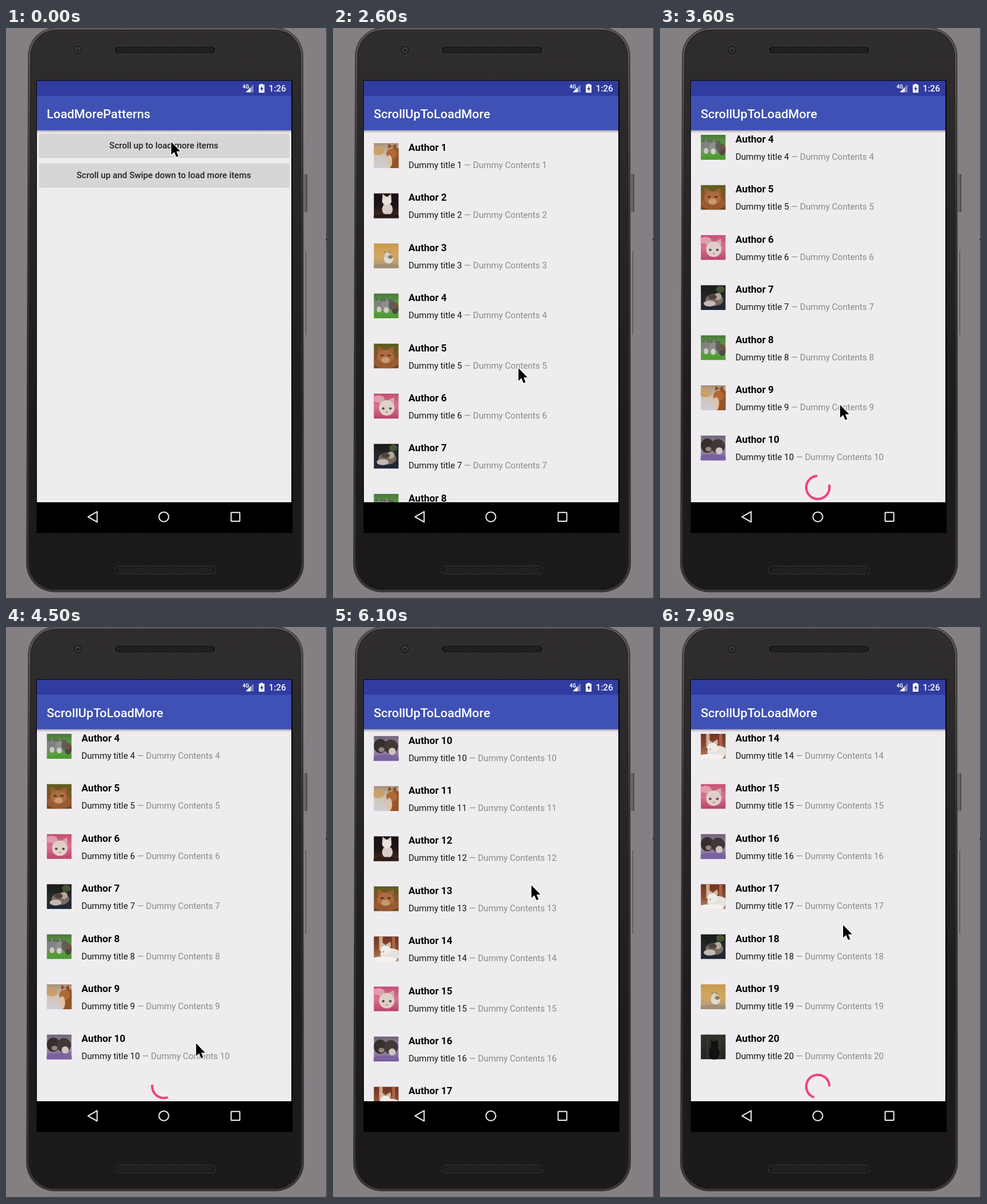
Write an HTML page that moves like this. It is 540 px wide and 962 px high and loops after 8000 ms.

```html
<!DOCTYPE html>
<html lang="en">
<head>
<meta charset="utf-8">
<title>Load more</title>
<style>
  html, body { margin: 0; width: 100%; height: 100%; overflow: hidden; background: #837f83; }
  svg { display: block; width: 100%; height: 100%; font-family: Roboto, "Noto Sans", sans-serif; }
  .title { font-size: 20.9px; font-weight: 500; fill: #fff; }
  .label { font-size: 14.6px; font-weight: 500; fill: #222; text-anchor: middle; }
  .author { font-size: 16.6px; font-weight: 700; fill: #050505; }
  .body { font-size: 14.6px; fill: #151415; }
  .soft { fill: #8a888b; }
  .wait { font-size: 14.6px; fill: #757377; text-anchor: middle; }
</style>
</head>
<body>
<svg id="stage" viewBox="0 0 540 962" xmlns="http://www.w3.org/2000/svg"></svg>
<script>
const LOOP = 8000, STEP = 100, PITCH = 84.4;
const PAGE_END = 267.2, LIST_AT = 2300, MORE_AT = 4900;
const BG = '#eeecef', PINK = '#f3427c';

const rect = (x, y, w, h, fill, more = '') =>
  `<rect x="${x}" y="${y}" width="${w}" height="${h}" fill="${fill}" ${more}/>`;
const oval = (fill, cx, cy, rx, ry) =>
  `<ellipse cx="${cx}" cy="${cy}" rx="${rx}" ry="${ry}" fill="${fill}"/>`;
const text = (cls, x, y, str) => `<text class="${cls}" x="${x}" y="${y}">${str}</text>`;
const gradient = (id, ...colors) => `<linearGradient id="${id}" x2="0" y2="1">` +
  colors.map((c, i) => `<stop offset="${i / (colors.length - 1)}" stop-color="${c}"/>`).join('') +
  '</linearGradient>';
const clip = (id, shape) => `<clipPath id="${id}">${shape}</clipPath>`;
const ears = (fill, cx, cy, w, h) =>
  `<path d="M${cx - w} ${cy}l1 ${-h} ${w - 1} ${h * .6}zM${cx + w} ${cy}l-1 ${-h} ${1 - w} ${h * .6}z" fill="${fill}"/>`;

// Thumbnails on a 42 by 42 square: sky colours and a few flat shapes
const thumbs = {
  side: [['#a78f74', '#d0c4b8', '#cfced8'], oval('#c9a06c', 8, 13, 10, 7), oval('#965426', 36, 27, 12, 20),
    ears('#8b4a22', 31, 9, 7, 8), oval('#ad6a38', 30, 18, 9, 9), oval('#dcc3ab', 26, 31, 5, 11)],
  white: [['#171113', '#1c1416', '#4b2c20'], oval('#d9cdc8', 23, 27, 9, 10), ears('#d8c6bf', 22, 10, 8, 9),
    oval('#ebe2dd', 22, 13, 8, 7), oval('#2c1a16', 21, 40, 24, 5)],
  sand: [['#c79b52', '#d2a860', '#a9977c'], oval('#a39076', 21, 39, 24, 5), oval('#e3dcd0', 25, 26, 8, 8),
    ears('#8d7c68', 23, 18, 5, 5), oval('#d9d0c4', 23, 20, 5, 5), oval('#8a7963', 28, 23, 4, 3)],
  lawn: [['#48793a', '#63a345', '#4c9a32'], oval('#7f827e', 9, 20, 8, 12), oval('#8d8f8b', 22, 21, 8, 12),
    oval('#4c4a46', 36, 25, 6, 10), oval('#5f5d59', 30, 19, 5, 9), ears('#62635f', 9, 13, 6, 6),
    ears('#62635f', 22, 14, 6, 6), oval('#c9c8c3', 9, 27, 4, 5), oval('#d3d1cb', 21, 28, 4, 5),
    oval('#75533a', 37, 21, 4, 5)],
  tabby: [['#5c5e20', '#84552a', '#6d4520'], oval('#9a5a30', 21, 31, 21, 11), ears('#a0602f', 20, 16, 14, 11),
    oval('#ac6c3e', 20, 22, 14, 11), oval('#c99a72', 20, 28, 7, 5), oval('#4b2a14', 14, 20, 3, 1.2),
    oval('#4b2a14', 26, 20, 3, 1.2)],
  pink: [['#c74f73', '#d97391', '#b8446a'], oval('#e39ab0', 8, 9, 10, 6), ears('#d3a9a6', 22, 17, 13, 11),
    oval('#e0cfc8', 22, 24, 13, 13), oval('#534744', 16, 25, 2.2, 2), oval('#534744', 28, 25, 2.2, 2),
    oval('#c58a8c', 22, 31, 1.8, 1.3)],
  night: [['#171a18', '#252a2b', '#202638'], oval('#465335', 33, 7, 7, 6), oval('#786a60', 23, 25, 15, 10),
    oval('#b3a79a', 29, 19, 6, 6), oval('#c3bab5', 15, 31, 10, 5), oval('#4d4038', 20, 20, 7, 4)],
  purple: [['#6f6276', '#a394b0', '#6c548c'], oval('#352f2e', 11, 17, 11, 12), oval('#403936', 29, 18, 12, 12),
    oval('#cfc4c2', 31, 26, 6, 6), oval('#94857c', 13, 23, 5, 4), oval('#7a61a0', 20, 39, 24, 7)],
  curtain: [['#713321', '#8a4c33', '#b98c68'], rect(9, 0, 6, 24, '#c9a98c'), rect(31, 0, 5, 22, '#a96648'),
    oval('#e8e2df', 28, 30, 17, 10), ears('#d8b8a4', 20, 18, 9, 9), oval('#efebe8', 20, 23, 9, 8),
    oval('#f5f2f0', 17, 39, 22, 5), oval('#d39a92', 16, 26, 1.6, 1.2)],
  black: [['#33322b', '#2b2a25', '#24231f'], rect(10, 0, 2, 42, '#3d3b33'), rect(31, 0, 2, 42, '#3d3b33'),
    oval('#121212', 23, 31, 9, 12), ears('#121212', 23, 16, 6, 7), oval('#121212', 23, 17, 6, 6)]
};
const order = ('side white sand lawn tabby pink night lawn side purple ' +
  'side white tabby curtain pink purple curtain night sand black').split(' ');

const row = (kind, i) => `<g class="row" transform="translate(0 ${i * PITCH})">
  <use href="#${kind}" x="68.5" y="194"/>
  ${text('author', 127, 207, 'Author ' + (i + 1))}
  ${text('body', 127, 236, `Dummy title ${i + 1} <tspan class="soft">— Dummy Contents ${i + 1}</tspan>`)}</g>`;

const bar = title => rect(52, 172, 428, 5, 'url(#shade)') + rect(52, 114, 428, 58.3, '#3f51b5') +
  text('title', 68.5, 151.8, title);

const button = (y, str) => rect(55.5, y + 1.5, 421, 39, '#000', 'rx="2" opacity=".16"') +
  rect(56, y, 420, 39, '#d6d5d7', 'rx="2"') + text('label', 265.5, y + 25, str);

const speaker = y => rect(182, y, 171, 14, '#3c3a3c', 'rx="7"') + rect(183, y + 1, 169, 12, '#151315', 'rx="6"') +
  rect(186, y + 2, 163, 10, 'url(#mesh)', 'rx="5"');

// Body outline, slightly wider at the bottom left
const phone = inset => {
  const l = 34 + inset, r = 501 - inset, t = inset - 1, b = 950.5 - inset, q = 48 - inset;
  const arc = `A${q} ${q} 0 0 1 `;
  return `M${l + 3} ${t + q}${arc}${l + q + 3} ${t}H${r - q - 1}${arc}${r - 1} ${t + q}` +
    `L${r} ${b - q}${arc}${r - q} ${b}H${l + q}${arc}${l} ${b - q}Z`;
};

const defs = `<defs>
  ${gradient('case', '#302d2f', '#272527', '#1e1c1e', '#1b191b')}
  ${gradient('rim', '#5a585a', '#343234', '#2c2a2c', '#3a383a')}
  <linearGradient id="shade" x2="0" y2="1"><stop stop-opacity=".3"/><stop offset="1" stop-opacity="0"/></linearGradient>
  <pattern id="mesh" width="4" height="4" patternUnits="userSpaceOnUse">
    <circle cx="1" cy="1" r=".9" fill="#373537"/><circle cx="3" cy="3" r=".9" fill="#373537"/></pattern>
  ${clip('content', rect(52, 172, 428, 627, '#000'))}
  ${clip('window', rect(52, 114, 428, 685, '#000'))}
  ${clip('press', rect(56, 178, 420, 39, '#000', 'rx="2"'))}
  ${clip('track', rect(196, 497.7, 139.5, 3.4, '#000'))}
  ${clip('square', rect(0, 0, 42, 42, '#000'))}
  ${Object.entries(thumbs).map(([id, [sky, ...parts]]) => gradient(id + 'Sky', ...sky) +
    `<g id="${id}" clip-path="url(#square)">${rect(0, 0, 42, 42, `url(#${id}Sky)`)}${parts.join('')}</g>`).join('')}
</defs>`;

const device = rect(0, 0, 540, 962, '#837f83') +
  rect(538.8, 0, 1.2, 962, '#3b393b') + rect(538, 355, 2, 3, '#2a282a') + rect(0, 960.5, 540, 1.5, '#3b393b') +
  rect(501, 246, 5.5, 64, '#676467') + rect(505.3, 246, 1.2, 64, '#3a383a') +
  rect(503.8, 376, 1.1, 141, '#4f4c4f') +
  `<path d="${phone(0)}" fill="#2b292b"/><path d="${phone(1)}" fill="url(#rim)"/>
   <path d="${phone(4)}" fill="#1c1a1c"/><path d="${phone(5)}" fill="url(#case)"/>` +
  oval('#353335', 121, 37, 10, 10) + oval('#242224', 121, 37, 8, 8) + oval('#3f4247', 121, 37, 4.5, 4.5) +
  oval('#1b1c20', 121, 37.5, 2.6, 2.6) +
  speaker(30) + speaker(906) + rect(51, 88, 431, 763, '#0a090a');

const status = rect(52, 89, 428, 25.2, '#303c9f') + `<g fill="#fff">
  <text x="398" y="101.5" font-size="8.6" font-weight="700">4G</text>
  <path d="M416.3 95.3V108.3H403.3z" opacity=".4"/><path d="M411.5 100.1V108.3H403.3z"/>
  <path d="M425.3 95.6h2.7v-1.6h4v1.6h2.8v13.4h-9.5z"/>
  <path d="M430.8 97.4l-3.4 5.6h2.2v4l3.5-5.7h-2.3z" fill="#303c9f"/>
  <text x="442" y="107" font-size="14.8" font-weight="500">1:26</text></g>`;

const nav = rect(52, 799, 430, 51.5, '#000') + `<g fill="none" stroke="#ececec" stroke-width="2">
  <path d="M138 823.6L153.3 814.9V832.3z" stroke-linejoin="round"/>
  <circle cx="265.5" cy="823.6" r="8.2"/><rect x="378.7" y="816.3" width="14.6" height="14.6" rx=".6"/></g>`;

const menu = rect(52, 172, 428, 627, BG) + bar('LoadMorePatterns') +
  button(178, 'Scroll up to load more items') +
  `<g clip-path="url(#press)"><circle id="ripple" cx="278" cy="197" r="0" fill="#000" opacity=".12"/></g>` +
  button(228, 'Scroll up and Swipe down to load more items');

const feed = `<g id="feed">${rect(52, 114, 428, 685, BG)}
  <g id="wait">${text('wait', 265.5, 479, 'Getting dummy items')}
    <g clip-path="url(#track)">${rect(196, 497, 140, 5, '#f2bccd')}
      ${rect(196, 497, 0, 5, PINK, 'id="run0"')}${rect(196, 497, 0, 5, PINK, 'id="run1"')}</g></g>
  <g clip-path="url(#content)"><g id="list">${order.map(row).join('')}
      <circle id="spin" r="19.5" fill="none" stroke="${PINK}" stroke-width="4" stroke-linecap="square" pathLength="360"/></g>
    <g id="glow"><circle cx="301" cy="736" r="808" fill="#3f51b5"/></g></g>
  ${bar('ScrollUpToLoadMore')}</g>`;

const pointer = `<path id="pointer" d="M0 0V21.5L5 17 8.5 25.2 12 23.7 8.6 15.8H15.2Z"
  fill="#000" stroke="#fff" stroke-width="2.6" paint-order="stroke" stroke-linejoin="round"/>`;

const stage = document.getElementById('stage');
stage.innerHTML = defs + device + `<g clip-path="url(#window)">${menu}${feed}</g>` + status + nav + pointer;

const $ = id => document.getElementById(id);
const set = (id, attrs) => { for (const k in attrs) $(id).setAttribute(k, attrs[k]); };
const show = (node, on) => node.setAttribute('display', on ? 'inline' : 'none');
const clamp = v => Math.max(0, Math.min(1, v));

// Linear interpolation through rows of [time, value, ...]
function track(keys, t, col = 1) {
  if (t <= keys[0][0]) return keys[0][col];
  for (let i = 1; i < keys.length; i++) {
    const a = keys[i - 1], b = keys[i];
    if (t <= b[0]) return a[col] + (b[col] - a[col]) * (t - a[0]) / (b[0] - a[0]);
  }
  return keys[keys.length - 1][col];
}

// cubic-bezier(.4, 0, .2, 1)
function ease(x) {
  let lo = 0, hi = 1, u = .5;
  for (let i = 0; i < 18; i++) {
    u = (lo + hi) / 2;
    const bx = 1.2 * u * (1 - u) ** 2 + .6 * u * u * (1 - u) + u ** 3;
    if (bx < x) lo = u; else hi = u;
  }
  return 3 * u * u * (1 - u) + u ** 3;
}

const mouse = [[700, 278, 192], [800, 281, 220], [1100, 317, 520], [1250, 321, 565], [1300, 321, 565],
  [1600, 318, 600], [2400, 312, 573], [2700, 312, 573], [3000, 318, 330], [3200, 318, 330], [3600, 303, 635],
  [4300, 318, 700], [5200, 326, 706], [5500, 326, 706], [5800, 335, 350], [6000, 335, 350],
  [6400, 330, 690], [6700, 335, 358], [6900, 335, 358], [7500, 316, 470], [7900, 308, 502]];
const scroll = [[2700, 0], [3000, 243], [3100, PAGE_END], [5500, PAGE_END], [5800, 623], [5900, 700],
  [6000, 750], [6200, 790], [6400, 800], [6700, 1111.2]];
const glow = [[2950, 0], [3100, .8], [3200, .6], [3500, 0], [6550, 0], [6700, .95], [6800, 1], [6900, .85], [7200, 0]];

function spinner(age, y) {
  const p = age % 1333 / 1333;
  const from = 270 * ease(clamp(2 * p - 1)), to = 270 * ease(clamp(2 * p));
  const turn = -132 + 90 * p + .126 * age + from;
  const sweep = Math.max(1, to - from);
  set('spin', {
    transform: `translate(265.5 ${y}) rotate(${turn})`,
    'stroke-dasharray': `${sweep} ${360 - sweep}`
  });
}

function progress(t) {
  const p = (t - 620) % 1600 / 1600;
  [0, 1].forEach(i => {
    const q = (p + i * .5) % 1;
    const head = ease(clamp(q / .42)), tail = ease(clamp((q - .27) / .45));
    set('run' + i, { x: 196 + 139.5 * tail, width: 139.5 * Math.max(0, head - tail) });
  });
}

const rows = [...document.querySelectorAll('.row')];

function draw(t) {
  const open = ease(clamp((t - 650) / 350));
  set('ripple', { r: t < 350 || t > 1000 ? 0 : (t - 300) * .75 });
  set('feed', { opacity: open, transform: `translate(0 ${50 * (1 - open)})` });
  show($('feed'), open > 0);

  const listed = t >= LIST_AT, more = t >= MORE_AT;
  show($('wait'), !listed);
  show($('list'), listed);
  if (!listed) progress(Math.max(t, 620));

  rows.forEach((r, i) => show(r, i < 10 || more));
  set('list', { transform: `translate(0 ${-track(scroll, t)})` });
  const age = t - (more ? 6160 : 2960);
  show($('spin'), age >= 0);
  if (age >= 0) spinner(age, 1041.2 + (more ? 10 * PITCH : 0));

  const k = track(glow, t);
  set('glow', { transform: `translate(0 799) scale(1 ${Math.max(k, .001)})`, opacity: .3 * k });
  set('pointer', { transform: `translate(${track(mouse, t)} ${track(mouse, t, 2)})` });
}

const start = performance.now();
function tick(now) {
  const t = Math.max(0, now - start) % LOOP;
  draw(Math.floor(t / STEP) * STEP);
  requestAnimationFrame(tick);
}
draw(0);
requestAnimationFrame(tick);
</script>
</body>
</html>
```
